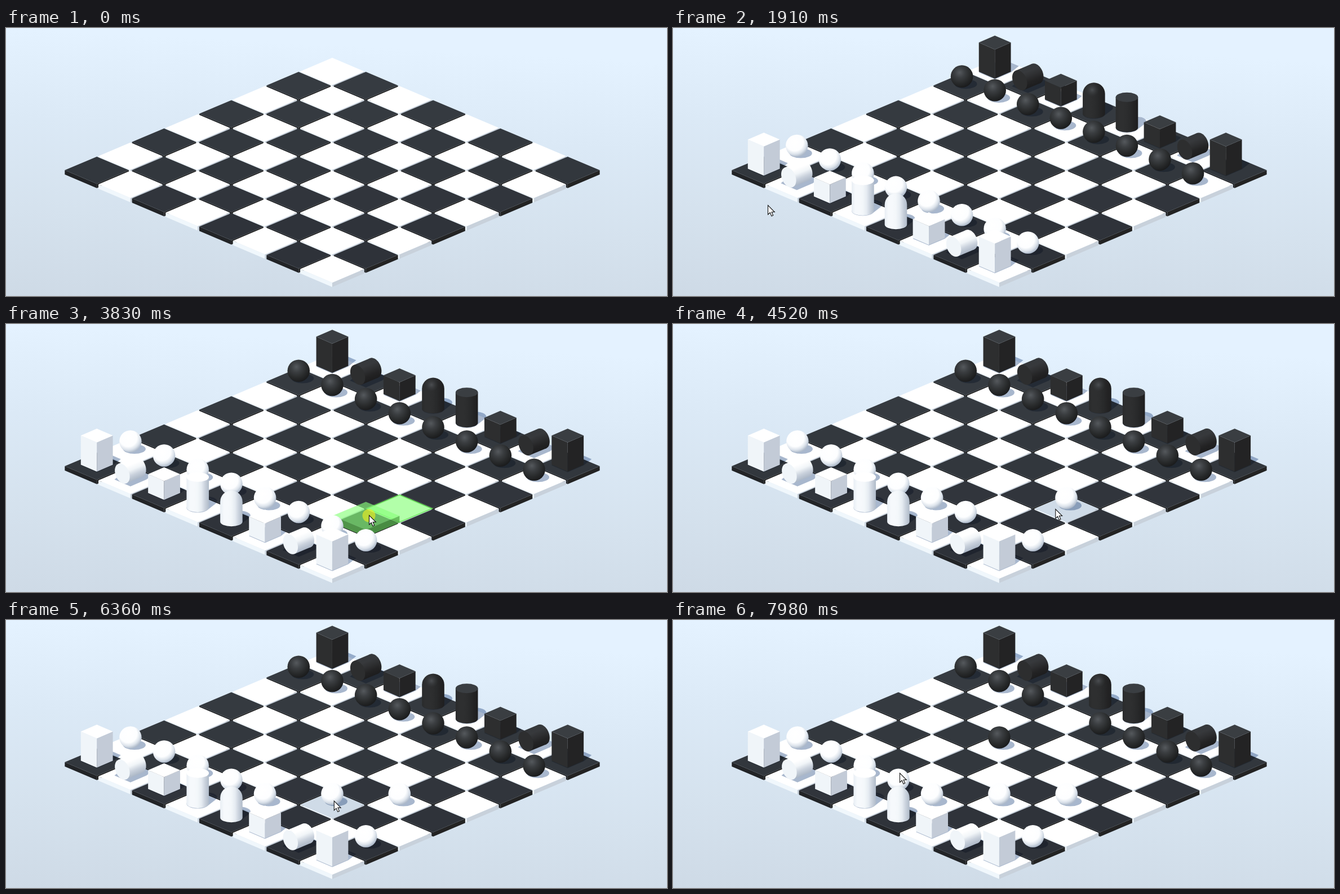
Recreate the animation shown at these times as an HTML page with a canvas. Size 1173 px wide and 477 px high, loop 8 s.

```html
<!DOCTYPE html>
<html lang="en">
<head>
<meta charset="utf-8">
<title>Chess board</title>
<style>
html, body { margin: 0; width: 100%; height: 100%; overflow: hidden; }
body { background: #d8e5f2; }
canvas { display: block; width: 100%; height: 100%; }
</style>
</head>
<body>
<canvas id="stage" width="1173" height="477"></canvas>
<script>
const ctx = document.getElementById('stage').getContext('2d');
const W = 1173, H = 477, LOOP = 8000;
const X0 = 161.2, Y0 = 253.1;            // centre of the left corner tile
const DX = 59.68, DY = 25.13, UP = 76.6; // screen size of one board unit
const SPAWN = 1680, EASE = 58;

const WHITE = {
  top: '#ffffff', left: '#f0f5f9', right: '#c3cbd7',
  body: ['#e8eef4', '#f6f9fc', '#f6f9fc', '#f3f7fa', '#e6ecf2', '#c9d1dc', '#b0bbc9'],
  barrel: ['#ffffff', '#ffffff', '#f1f5f8', '#c9d1dc', '#adb8c7'],
  ball: ['#ffffff', '#fdfeff', '#dce3eb', '#aebaca']
};
const BLACK = {
  top: '#3a3e42', left: '#2d2e2f', right: '#232324',
  body: ['#2a2b2c', '#2e2f30', '#2e2f30', '#2c2d2e', '#28292a', '#232324', '#1e1e1f'],
  barrel: ['#35383b', '#37393c', '#2e2f31', '#232324', '#1d1d1e'],
  ball: ['#55595d', '#3b3e41', '#292b2c', '#1b1c1d']
};

const BACK = ['rook', 'knight', 'bishop', 'king', 'queen', 'bishop', 'knight', 'rook'];
const pieces = [];
BACK.forEach((kind, a) => {
  pieces.push({ kind: a === 3 || a === 4 ? BACK[7 - a] : kind, a, b: 0, skin: WHITE },
    { kind: 'pawn', a, b: 1, skin: WHITE }, { kind: 'pawn', a, b: 6, skin: BLACK },
    { kind, a, b: 7, skin: BLACK });
});
const heights = { rook: 52, bishop: 33.5, knight: 34, queen: 54, king: 52, cube: 26 };

// press and release times of each drag
const moves = [
  { a: 6, b: 1, to: 3, step: 1, down: 3360, up: 4180 },
  { a: 5, b: 1, to: 2, step: 1, down: 5130, up: 5720 },
  { a: 3, b: 6, to: 4, step: -1, down: 7060, up: 7540 }
];

// cursor: time, x, y
const path = [
  [860, 308, 466], [1280, 168, 315], [2080, 168, 315], [2900, 577, 354], [3420, 577, 354],
  [3830, 644, 340], [4080, 698, 328], [4380, 698, 328], [5060, 521, 337], [5300, 521, 337],
  [5650, 579, 326], [6290, 579, 326], [6980, 672, 179], [7220, 672, 179], [7480, 579, 230],
  [7600, 579, 230], [7980, 402, 272]
];

const place = (a, b) => [X0 + DX * (a + b), Y0 + DY * (a - b)];
const diamond = (x, y, w, h) => [[x, y - h], [x + w, y], [x, y + h], [x - w, y]];

function poly(points, fill) {
  ctx.beginPath();
  points.forEach(p => ctx.lineTo(p[0], p[1]));
  ctx.closePath();
  ctx.fillStyle = fill;
  ctx.fill();
}

function oval(x, y, rx, ry, fill) {
  ctx.beginPath();
  ctx.ellipse(x, y, rx, ry, 0, 0, 7);
  ctx.fillStyle = fill;
  ctx.fill();
}

function blend(x0, y0, x1, y1, colors) {
  const g = ctx.createLinearGradient(x0, y0, x1, y1);
  colors.forEach((c, i) => g.addColorStop(i / (colors.length - 1), c));
  return g;
}

// block with its top face centred on x, y
function block(x, y, w, h, depth, skin) {
  poly([[x - w, y], [x, y + h], [x, y + h + depth], [x - w, y + depth]], skin.left);
  poly([[x + w, y], [x, y + h], [x, y + h + depth], [x + w, y + depth]], skin.right);
  poly(diamond(x, y, w, h), skin.top);
}

function drawTile(a, b, hover) {
  const [x, y] = place(a, b);
  const dark = (a + b) % 2 === 0;
  const k = (y - 78) / 352;
  const mix = (p, q) => Math.round(p + (q - p) * k);
  block(x, y, 56.9, 24.2, 7.7, dark
    ? { top: `rgb(${mix(55, 45)},${mix(60, 49)},${mix(66, 56)})`, left: '#222427', right: '#232323' }
    : { top: hover ? '#cfdbe7' : '#ffffff', left: '#f0f7fc', right: '#c8d1db' });
}

function drawShadow(p, x, y) {
  const color = '#a8b7cd';
  const h = heights[p.kind], sx = h * 0.272, sy = h * -0.214;
  const w = 28.4, d = 12.2;
  y -= 1.5;
  if (p.kind === 'pawn') return oval(x + 7, y - 4, 20, 8.6, color);
  if (p.kind === 'queen' || p.kind === 'king') {
    const pts = [];
    for (let i = 0; i < 40; i++) {
      const q = i * Math.PI / 20, c = Math.cos(q), s = Math.sin(q);
      const far = c * sx / 19.8 + s * sy / 8.6 > 0 ? 1 : 0;
      pts.push([x + 19.8 * c + far * sx, y + 8.6 * s + far * sy]);
    }
    return poly(pts, color);
  }
  poly([[x - w, y], [x, y + d], [x + w, y], [x + w + sx, y + sy], [x + sx, y - d + sy], [x - w + sx, y + sy]], color);
}

function drawBall(x, y, skin) {
  const g = ctx.createRadialGradient(x - 4, y - 7, 0, x - 4, y - 6, 26);
  const stops = skin === WHITE ? [0, 0.6, 0.82, 1] : [0, 0.35, 0.7, 1];
  skin.ball.forEach((c, i) => g.addColorStop(stops[i], c));
  oval(x, y, 19.8, 19.8, g);
}

function drawColumn(x, y, kind, skin) {
  const r = 19.8, ry = 8.5;
  const top = kind === 'queen' ? y - 54 : y - 35.5;
  ctx.beginPath();
  ctx.moveTo(x - r, top);
  if (kind === 'king') ctx.arc(x, top, r, Math.PI, 0);
  else ctx.lineTo(x + r, top);
  ctx.lineTo(x + r, y);
  ctx.ellipse(x, y, r, ry, 0, 0, Math.PI);
  ctx.closePath();
  ctx.fillStyle = blend(x - r, 0, x + r, 0, skin.body);
  ctx.fill();
  if (kind === 'queen') return oval(x, top, r, ry, skin.top);
  if (skin === BLACK) {
    const g = ctx.createRadialGradient(x - 3, top - 7, 0, x - 3, top - 7, 12);
    g.addColorStop(0, 'rgba(85,89,93,.75)');
    g.addColorStop(1, 'rgba(60,63,66,0)');
    oval(x - 3, top - 7, 12, 12, g);
  }
}

// cylinder lying along the b axis
function drawBarrel(x, y, skin) {
  const r = 0.222, h = 0.243;
  const rim = (q, end) => [
    x + DX * (r * Math.cos(q) + end * h),
    y + DY * (r * Math.cos(q) - end * h) - UP * r * Math.sin(q)
  ];
  const ring = end => Array.from({ length: 48 }, (_, i) => rim(i * Math.PI / 24, end));
  const q = -0.99;
  const fill = blend(x - 7, y - 17, x + 7, y + 17, skin.barrel);
  poly(ring(1), fill);
  poly([rim(q, 1), rim(q, -1), rim(q + Math.PI, -1), rim(q + Math.PI, 1)], fill);
  poly(ring(-1), skin.left);
}

function drawPiece(p, x, y) {
  const base = y - 2.6;
  if (p.kind === 'pawn') drawBall(x, y - 19, p.skin);
  else if (p.kind === 'knight') drawBarrel(x, y - 18, p.skin);
  else if (p.kind === 'queen' || p.kind === 'king') drawColumn(x, base + 0.7, p.kind, p.skin);
  else block(x, base - heights[p.kind], 28.4, 12.3, heights[p.kind], p.skin);
}

function drawMark(a, b, lifted) {
  const [x, y] = place(a, b);
  const green = 'rgba(137,255,123,.65)';
  if (lifted) {
    block(x, y - 12, DX, DY, 12, { top: green, left: 'rgba(95,190,80,.7)', right: 'rgba(80,170,68,.75)' });
    return;
  }
  poly(diamond(x, y, DX, DY), green);
  ctx.beginPath();
  diamond(x, y, DX - 2, DY - 0.9).forEach(p => ctx.lineTo(...p));
  ctx.closePath();
  ctx.strokeStyle = 'rgba(100,228,84,.65)';
  ctx.lineWidth = 2;
  ctx.stroke();
}

function cursorAt(t) {
  if (t < path[0][0]) return null;
  for (let i = 1; i < path.length; i++) {
    const [t0, x0, y0] = path[i - 1], [t1, x1, y1] = path[i];
    if (t < t1) {
      const u = (t - t0) / (t1 - t0), k = u * u * (3 - 2 * u);
      return [x0 + (x1 - x0) * k, y0 + (y1 - y0) * k];
    }
  }
  return path[path.length - 1].slice(1);
}

function tileAt([x, y]) {
  const s = (x - X0) / DX, d = (y - Y0) / DY;
  return [Math.round((s + d) / 2), Math.round((s - d) / 2)];
}

function drawCursor([x, y], pressed) {
  if (pressed) oval(x, y + 1, 11.5, 11.5, 'rgba(250,243,25,.58)');
  ctx.beginPath();
  [[0, 0], [0, 16.5], [3.8, 13], [6.4, 19.2], [9.2, 18], [6.6, 12], [11.8, 12]]
    .forEach(p => ctx.lineTo(x + 0.5 + p[0], y + 0.5 + p[1]));
  ctx.closePath();
  ctx.fillStyle = '#fff';
  ctx.strokeStyle = '#111';
  ctx.lineWidth = 1.1;
  ctx.fill();
  ctx.stroke();
}

const settle = dt => 1 - Math.exp(-dt / EASE);

// pieces fan out from the corner; moved pawns glide after the release
function spot(p, t) {
  const spread = settle(t - SPAWN);
  const m = moves.find(m => m.a === p.a && m.b === p.b && t > m.up);
  const b = m ? m.b + (m.to - m.b) * settle(t - m.up) : p.b;
  return [p.a * spread, b * spread];
}

function render(t) {
  ctx.fillStyle = blend(0, 0, -25, H, ['#e4f2ff', '#dbe9f6', '#d5e2ee', '#cedae6']);
  ctx.fillRect(0, 0, W, H);

  const cursor = cursorAt(t);
  const playing = t >= SPAWN;
  const [ha, hb] = cursor && playing ? tileAt(cursor) : [-1, -1];
  for (let d = -7; d <= 7; d++) {
    for (let a = Math.max(0, d); a < 8 && a - d < 8; a++) drawTile(a, a - d, a === ha && a - d === hb);
  }

  let set = [];
  if (playing) {
    set = pieces.map(p => ({ p, at: spot(p, t) }))
      .sort((m, n) => m.at[0] - m.at[1] - n.at[0] + n.at[1]);
    ctx.globalCompositeOperation = 'darken';
    ctx.globalCompositeOperation = 'multiply';
    set.forEach(o => drawShadow(o.p, ...place(...o.at)));
    ctx.globalCompositeOperation = 'source-over';
  } else if (t >= 620) {
    set = [{ p: { kind: 'cube', skin: WHITE }, at: [0, 0] }];
  }

  const drag = moves.find(m => t >= m.down && t < m.up);
  if (drag) {
    for (const n of [2, 1]) {
      const b = drag.b + drag.step * n;
      drawMark(drag.a, b, drag.a === ha && b === hb);
    }
  }
  set.forEach(o => drawPiece(o.p, ...place(...o.at)));
  if (cursor) drawCursor(cursor, Boolean(drag));
}

const start = performance.now();
function tick() {
  render((performance.now() - start) % LOOP);
  requestAnimationFrame(tick);
}
tick();
</script>
</body>
</html>
```
